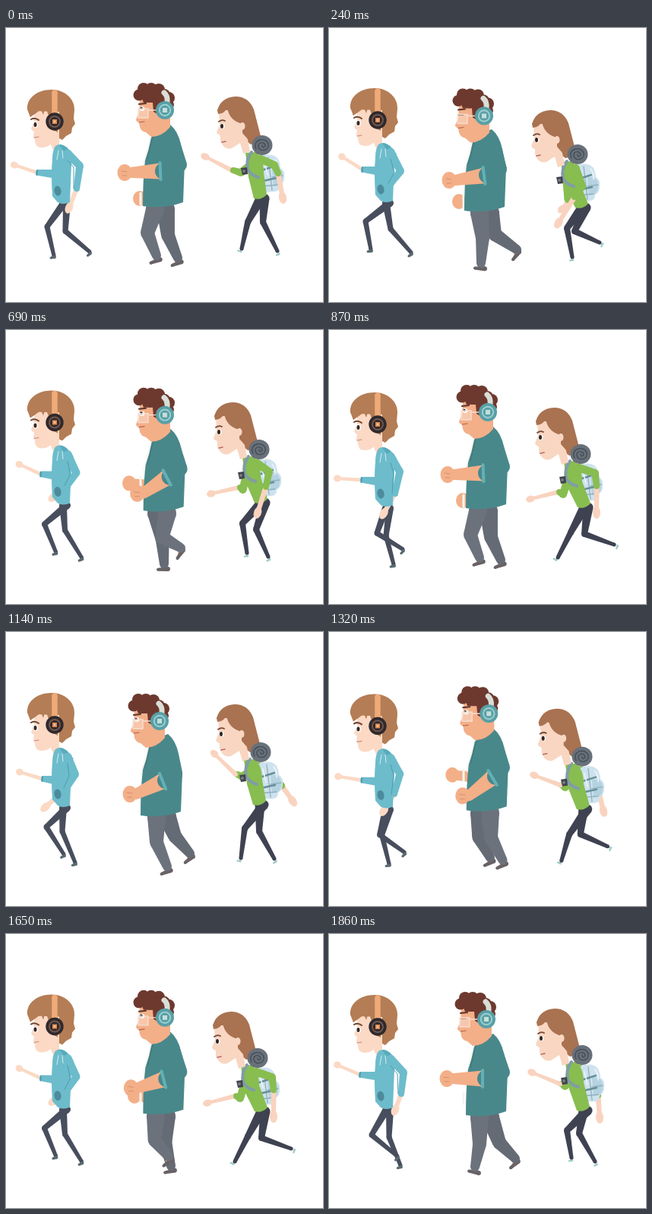
These frames come from a looping animation (417x360 px, 1.89 s). An HTML page with a canvas:

```html
<!DOCTYPE html>
<html lang="en">
<head>
<meta charset="utf-8">
<title>Three walkers</title>
<style>
html, body { margin: 0; width: 100%; height: 100%; overflow: hidden; background: #fff; }
canvas { display: block; width: 417px; height: 360px; }
</style>
</head>
<body>
<canvas id="stage"></canvas>
<script>
const W = 417, H = 360, LOOP = 1890, STEP = 30;
const canvas = document.getElementById('stage');
const ctx = canvas.getContext('2d');
const dpr = window.devicePixelRatio || 1;
canvas.width = W * dpr;
canvas.height = H * dpr;

// Pose rows start with their time in the walk cycle.
// Arms: head x y, body x y, front cuff, front hand, rear elbow, rear cuff, rear hand.
// Legs: hip, knee A, ankle A, knee B, ankle B.
const boy = {
  period: 480,
  arms: [
    [0, 0, 0, 0, 0, 41, 190, 11, 180, 97, 181, 93, 211, 83, 236],
    [30, 0, 0, 0, 0, 41, 190, 11, 180, 97, 181, 93, 211, 83, 236],
    [180, 0, -1, 0, -1, 48, 193, 18, 184, 91, 187, 80, 205, 52, 230],
    [240, 0, -2, 0, -2, 44, 186, 17, 169, 94, 188, 82, 204, 73, 209],
    [390, 0, 1, 0, 1, 43, 197, 11, 195, 93, 186, 87, 215, 72, 241],
    [420, 0, -1, 0, -1, 41, 185, 11, 172, 98, 182, 95, 210, 87, 231]
  ],
  legs: [
    [0, 77, 232, 54, 261, 63, 299, 78, 267, 110, 294],
    [30, 77, 232, 54, 261, 63, 299, 78, 267, 110, 294],
    [180, 77, 231, 74, 262, 91, 303, 53, 256, 76, 292],
    [240, 77, 230, 81, 264, 108, 295, 48, 254, 55, 291],
    [390, 77, 234, 63, 267, 97, 288, 75, 270, 85, 308],
    [420, 77, 232, 56, 264, 90, 292, 79, 267, 94, 304]
  ]
};

const man = {
  period: 870,
  arms: [
    [0, 0, 0, 0, 0, 203, 188, 156, 190, 229, 180, 205, 188, 176, 224],
    [120, -2, 4, 0, 4, 202, 190, 155, 190, 229, 182, 204, 190, 190, 215],
    [240, -5, 7.5, -2, 6, 204, 194, 158, 200, 225, 186, 206, 193, 171, 228],
    [270, -7, 9, -3, 7, 206, 196, 163, 213, 223, 188, 208, 195, 190, 220],
    [510, 4, -4, 2, -2, 218, 190, 180, 216, 231, 175, 220, 188, 153, 177],
    [600, 0, 5.5, 1, 5, 216, 197, 181, 227, 230, 184, 218, 195, 155, 190]
  ],
  legs: [
    [0, 203, 238, 186, 269, 198, 302, 213, 272, 226, 305],
    [120, 205, 241, 198, 276, 192, 309, 224, 274, 245, 298],
    [240, 205, 243, 202, 276, 200, 312, 218, 271, 247, 294],
    [270, 205, 243, 198, 276, 212, 311, 222, 268, 242, 294],
    [510, 205, 236, 218, 268, 234, 300, 189, 270, 202, 301],
    [600, 206, 242, 215, 274, 246, 283, 202, 276, 199, 313]
  ]
};

const girl = {
  period: 780,
  arms: [
    [0, 0, 0, 0, 0, 297, 187, 262, 169, 353, 180, 358, 191, 364, 223],
    [90, -6, 12, -6, 9, 301, 213, 265, 222, 350, 188, 352, 205, 352, 240],
    [240, -11, 18, -10, 12, 318, 222, 306, 238, 333, 208, 323, 222, 302, 256],
    [300, -5, 8, -4, 5, 304, 197, 267, 182, 350, 195, 354, 212, 356, 241],
    [360, -1, 5, -2, 4, 302, 187, 274, 160, 352, 188, 363, 202, 377, 222],
    [510, -2, 12, -4, 11, 304, 200, 270, 183, 350, 196, 358, 213, 367, 234],
    [690, -4, 5, -4, 3, 306, 207, 270, 215, 346, 186, 342, 206, 331, 240]
  ],
  legs: [
    [0, 337, 224, 318, 255, 310, 290, 338, 255, 357, 293],
    [90, 338, 233, 318, 266, 301, 299, 336, 268, 375, 282],
    [240, 335, 236, 313, 263, 320, 301, 323, 267, 356, 282],
    [300, 337, 232, 329, 262, 350, 299, 313, 258, 319, 294],
    [360, 336, 227, 333, 262, 353, 298, 314, 258, 309, 297],
    [510, 337, 233, 333, 266, 370, 281, 317, 268, 302, 301],
    [630, 336, 232, 324, 265, 356, 284, 313, 260, 317, 299],
    [690, 338, 227, 311, 254, 317, 293, 329, 262, 345, 298]
  ]
};

function sample(rows, period, t) {
  const p = t % period;
  let i = rows.length - 1;
  while (rows[i][0] > p) i--;
  const a = rows[i], b = rows[(i + 1) % rows.length];
  const end = i + 1 < rows.length ? b[0] : period;
  const k = (p - a[0]) / (end - a[0]);
  return a.slice(1).map((v, j) => v + (b[j + 1] - v) * k);
}

function shape(color, d) {
  ctx.fillStyle = color;
  ctx.fill(new Path2D(d));
}

function line(color, width, d) {
  ctx.strokeStyle = color;
  ctx.lineWidth = width;
  ctx.lineCap = ctx.lineJoin = 'round';
  ctx.stroke(new Path2D(d));
}

function oval(color, x, y, rx, ry = rx, turn = 0) {
  ctx.fillStyle = color;
  ctx.beginPath();
  ctx.ellipse(x, y, rx, ry, turn, 0, Math.PI * 2);
  ctx.fill();
}

// Tapered chain of x, y, width triples.
function limb(color, ...p) {
  for (let i = 0; i < p.length; i += 3) {
    const [x, y, w, u, v, z] = p.slice(i, i + 6);
    oval(color, x, y, w / 2);
    if (u === undefined) return;
    const len = Math.hypot(u - x, v - y) || 1;
    const nx = (y - v) / len / 2, ny = (u - x) / len / 2;
    ctx.beginPath();
    ctx.moveTo(x + nx * w, y + ny * w);
    ctx.lineTo(u + nx * z, v + ny * z);
    ctx.lineTo(u - nx * z, v - ny * z);
    ctx.lineTo(x - nx * w, y - ny * w);
    ctx.fill();
  }
}

function at(x, y, draw) {
  ctx.save();
  ctx.translate(x, y);
  draw();
  ctx.restore();
}

function hand(color, fx, fy, x, y, rx, ry) {
  oval(color, x, y, rx, ry, Math.atan2(y - fy, x - fx));
}

// Unit vector from heel to toe for a shin.
function toe(kx, ky, x, y) {
  const len = Math.hypot(x - kx, y - ky) || 1;
  return [(ky - y) / len, (x - kx) / len];
}

function leg(color, widths, hx, hy, kx, ky, x, y) {
  limb(color, hx, hy, widths[0], kx, ky, widths[1], x, y, widths[2]);
}

function headphone(x, y, r, dark, mid, core) {
  oval(dark, x, y, r);
  oval(mid, x, y, r * .68);
  oval(dark, x, y, r * .52);
  ctx.fillStyle = core;
  ctx.fillRect(x - 3, y - 3, 6, 6);
}

function drawBoy(t) {
  const skin = '#fbd9c5', blue = '#6dbccb', edge = '#4b9db0', trousers = '#484e5d';
  const [hx, hy, bx, by, cx, cy, fx, fy, ex, ey, sx, sy, rx, ry] = sample(boy.arms, boy.period, t);
  const [px, py, ka, kb, aa, ab, kc, kd, ac, ad] = sample(boy.legs, boy.period, t);

  for (const [dx, u, v, x, y] of [[3, kc, kd, ac, ad], [-2, ka, kb, aa, ab]]) {
    leg(trousers, [10, 7, 5], px + dx, py, u, v, x, y);
    const [tx, ty] = toe(u, v, x, y);
    limb('#596a70', x + 1, y + 2, 4, x + tx * 4, y + ty * 4 + 2, 3);
  }

  limb(skin, sx, sy, 6, rx, ry, 6);
  hand(skin, sx, sy, rx, ry, 8, 5);
  limb(skin, cx, cy, 5, fx, fy, 4);
  hand(skin, cx, cy, fx, fy, 5, 4.5);
  limb(blue, 67, cy + 2, 12, cx + 2, cy, 8);
  limb(edge, cx, cy - 3, 2, cx - .5, cy + 3, 2);

  at(bx, by, () => {
    shape(skin, 'M56 147H70V160H62Z');
    shape(blue, 'M65 155Q72 150 80 157Q87 165 86 180L84 229Q75 233 68 229L61 221Q59 192 61 172Q61 161 65 155Z');
    shape('#58abbc', 'M70 153Q80 153 89 168Q79 169 70 153Z');
    oval('#4d8b9c', 68, 214, 4.5, 6.5, -.2);
    line('#d5eef2', 1, 'M69 161L67 173M74 161L75 171');
  });
  limb(blue, 81 + bx, 165 + by, 11, ex, ey, 10, sx, sy, 8);
  line(edge, 1, `M${81 + bx} ${174 + by}L${ex - 8} ${ey + 2}L${sx - 4} ${sy}`);

  at(hx, hy, () => {
    shape('#b47d55', 'M28 107C27 92 41 81 60 81C78 81 91 94 90 108L89 119L91 126L87 131L86 138L79 142L74 147L60 140L38 111L32 117Z');
    shape(skin, 'M37 109L37 124L33 132Q34 135 37 136L36 142L38 147Q38 157 47 157Q57 157 64 147L70 149V110Z');
    shape('#b47d55', 'M29 106Q31 97 44 94L68 98V137L60 133L56 115L52 104L49 114L46 107L38 113L32 117Z');
    line('#70452f', 2, 'M33 120Q38 117 43 121');
    oval('#fff', 39, 127, 3, 4);
    oval('#342823', 38.5, 127, 2, 3);
    line('#c98979', 1.1, 'M37 144L43 143');
    limb('#eeaa79', 64, 85, 7.5, 64, 112, 7.5);
    headphone(64, 123, 11.7, '#30292c', '#71584f', '#e18b52');
    oval('#f7c49c', 64, 123, 1.4);
  });
}

function manHead(closed) {
  const skin = '#f3af88', hair = '#6d392f';
  shape(skin, 'M176 94L175 111L171 120Q171 123 175 124L176 130Q178 136 184 137L191 143Q205 143 216 130V99L200 91Z');
  for (const [x, y, r] of [[175, 88, 7.5], [181, 80, 8], [191, 80, 8], [201, 81, 8], [208, 88, 8], [214, 92, 8], [215, 101, 6], [190, 89, 9]])
    oval(hair, x, y, r);
  shape(hair, 'M176 86H213V104L201 100L199 113L194 110L193 98H181Z');
  line('#59342a', 2, 'M175 100L184 99');
  if (closed) line('#59342a', 1.2, 'M175 107L182 107');
  else {
    oval('#fff', 179, 106, 3.5, 3);
    oval('#33231f', 178, 105.5, 1.8);
  }
  ctx.globalAlpha = .3;
  shape('#fff', 'M174 106H187V118H174Z');
  ctx.globalAlpha = 1;
  line('#f7ded0', 1.4, 'M174 106H187V118H174ZM187 108H198');
  line('#b4624d', 1.2, 'M175 124L182 123');
  line('#d9ded7', 7, 'M208 85Q213 89 212 98');
  headphone(209, 108, 12, '#599fa6', '#9bd0d0', '#c5dfda');
}

function drawMan(t) {
  const skin = '#f3af88', teal = '#49888a', trousers = '#6c727c';
  const [hx, hy, bx, by, cx, cy, fx, fy, ex, ey, sx, sy, rx, ry] = sample(man.arms, man.period, t);
  const [px, py, ka, kb, aa, ab, kc, kd, ac, ad] = sample(man.legs, man.period, t);
  const p = t % man.period;

  for (const [side, u, v, x, y] of [[1, kc, kd, ac, ad], [-1, ka, kb, aa, ab]]) {
    const front = x < (aa + ac) / 2 ? -1 : 1;
    const [tx, ty] = toe(u, v, x, y);
    limb(skin, x, y, 7, x - ty * .5, y + 3, 7);
    limb('#686267', x - tx * 5, y - ty * 5 + 4, 6, x + tx * 8, y + ty * 8 + 4, 4);
    leg(side > 0 ? '#656b75' : trousers, [24, 18, 12], px + front * 7, py, u, v, x, y - 3);
  }

  limb(skin, 192, ry + 3, 15, rx, ry, 12);
  oval(skin, rx, ry, 9, 10);
  limb('#f7f4f0', 177, ry - 7, 3, 177, ry + 8, 3);

  at(bx, by, () => {
    shape('#f9f7f4', 'M190 140L179 181L189 194L200 140Z');
    shape(teal, 'M191 144Q200 133 216 127Q226 135 230 153L235 177L233 229Q208 238 180 234Q180 199 183 174Q188 160 191 144Z');
    line('#3c7779', 1, 'M193 143L186 172');
  });
  limb(skin, cx, cy, 21, fx + 8, fy, 14);
  oval(skin, fx, fy, 9.5, 11);
  line('#d98e6d', 1, `M${fx - 4} ${fy - 2}L${fx + 3} ${fy - 1}M${fx - 3} ${fy + 4}L${fx + 3} ${fy + 4}`);
  limb(teal, 219 + bx, 148 + by, 18, ex, ey, 18, sx + 2, sy, 22);
  const a = Math.atan2(fy - cy, fx - cx);
  const nx = Math.sin(a) * 11, ny = -Math.cos(a) * 11;
  limb('#62b0b7', cx + nx, cy + ny, 4, cx - nx, cy - ny, 4);

  at(hx, hy, () => manHead(p >= 120 && p < 270));
}

function backpack() {
  shape('#cee2ee', 'M334 169Q350 163 358 172Q361 179 361 184Q367 187 366 196Q366 204 360 207Q360 215 353 215L338 216Q329 202 329 184Z');
  shape('#b5d2e1', 'M350 184Q365 182 364 197Q364 207 352 208Z');
  line('#8fb1be', 1.3, 'M345 170L350 213M350 196L364 194M335 208L358 206');
  line('#688f99', 2.5, 'M336 187L355 181M338 201L356 197');
  line('#eef6fa', 1.5, 'M354 173Q359 180 358 187M340 176L344 193');
}

function mat() {
  oval('#687079', 337, 154, 13.5, 13);
  line('#444c55', 1.4, 'M329 159C323 147 341 142 345 152C347 161 334 164 332 156C331 149 341 149 341 155Q337 159 337 154');
}

function girlHead() {
  const skin = '#f9d6c2', hair = '#a97251';
  shape(hair, 'M278 108Q283 91 302 90Q319 90 326 107L335 142Q333 151 322 153L305 140Z');
  shape(skin, 'M280 108L281 127L277 137Q278 140 282 141L282 148L285 154Q290 160 297 158L308 151L312 165L321 162L315 131L307 108Z');
  shape(hair, 'M278 108Q286 96 302 97L317 112L318 146L311 138V126Q294 122 291 105Q288 112 279 113Z');
  oval(skin, 311, 129, 3.5, 5);
  line('#744a36', 1.8, 'M280 123Q284 120 288 122');
  oval('#fff', 284.5, 129, 3, 3.5);
  oval('#30231f', 284, 129, 2, 3);
  line('#bd6a66', 1.6, 'M284 150L289 149');
}

function drawGirl(t) {
  const skin = '#f9d3bf', green = '#88bd50', trousers = '#3f4251';
  const [hx, hy, bx, by, cx, cy, fx, fy, ex, ey, sx, sy, rx, ry] = sample(girl.arms, girl.period, t);
  const [px, py, ka, kb, aa, ab, kc, kd, ac, ad] = sample(girl.legs, girl.period, t);
  const p = t % girl.period, behind = p >= 270 && p < 600;

  const rearArm = () => {
    limb(skin, sx, sy, 7, rx, ry, 6);
    hand(skin, sx, sy, rx, ry, 8, 5);
    limb(green, 334 + bx, 172 + by, 11, ex, ey, 10, sx, sy, 8);
  };

  for (const [dx, u, v, x, y] of [[3, kc, kd, ac, ad], [-2, ka, kb, aa, ab]]) {
    const [tx, ty] = toe(u, v, x, y);
    const qx = x + (x - u) * .12, qy = y + (y - v) * .1;
    limb('#eef3f2', x, y, 4, qx, qy, 4);
    limb('#9bcbc6', qx, qy, 2.5, qx + tx * 4, qy + ty * 4, 2);
    leg(trousers, [13, 8, 5], px + dx, py, u, v, x, y);
  }

  if (behind) rearArm();
  at(bx, by, backpack);
  if (!behind) {
    limb(skin, cx, cy, 6, fx, fy, 4);
    hand(skin, cx, cy, fx, fy, 6, 4.5);
  }
  shape(green, `M${315 + bx} ${164 + by}L${329 + bx} ${163 + by}Q${339 + bx} ${171 + by} ${339 + bx} ${190 + by}L${px + 6} ${py - 5}Q${px - 2} ${py + 3} ${px - 11} ${py}L${319 + bx} ${196 + by}Z`);
  limb(green, 322 + bx, 180 + by, 11, (cx + 321 + bx) / 2, cy + 3, 10, cx + 2, cy, 8);
  if (behind) {
    limb(skin, cx, cy, 6, fx, fy, 4);
    hand(skin, cx, cy, fx, fy, 6, 4.5);
  }
  at(bx, by, () => {
    line('#809ca8', 4, 'M323 163Q315 174 318 186Q323 194 332 196');
    shape('#41434b', 'M309 184L317 183L318 192L311 193Z');
    oval('#777d85', 313, 188, 2);
  });
  if (!behind) rearArm();
  at(hx, hy, girlHead);
  at(bx, by, mat);
}

const start = performance.now();

function render(now) {
  const t = Math.floor((Math.max(0, now - start) % LOOP) / STEP) * STEP;
  ctx.setTransform(dpr, 0, 0, dpr, 0, 0);
  ctx.fillStyle = '#fff';
  ctx.fillRect(0, 0, W, H);
  drawBoy(t);
  drawMan(t);
  drawGirl(t);
  requestAnimationFrame(render);
}
render(start);
</script>
</body>
</html>
```
